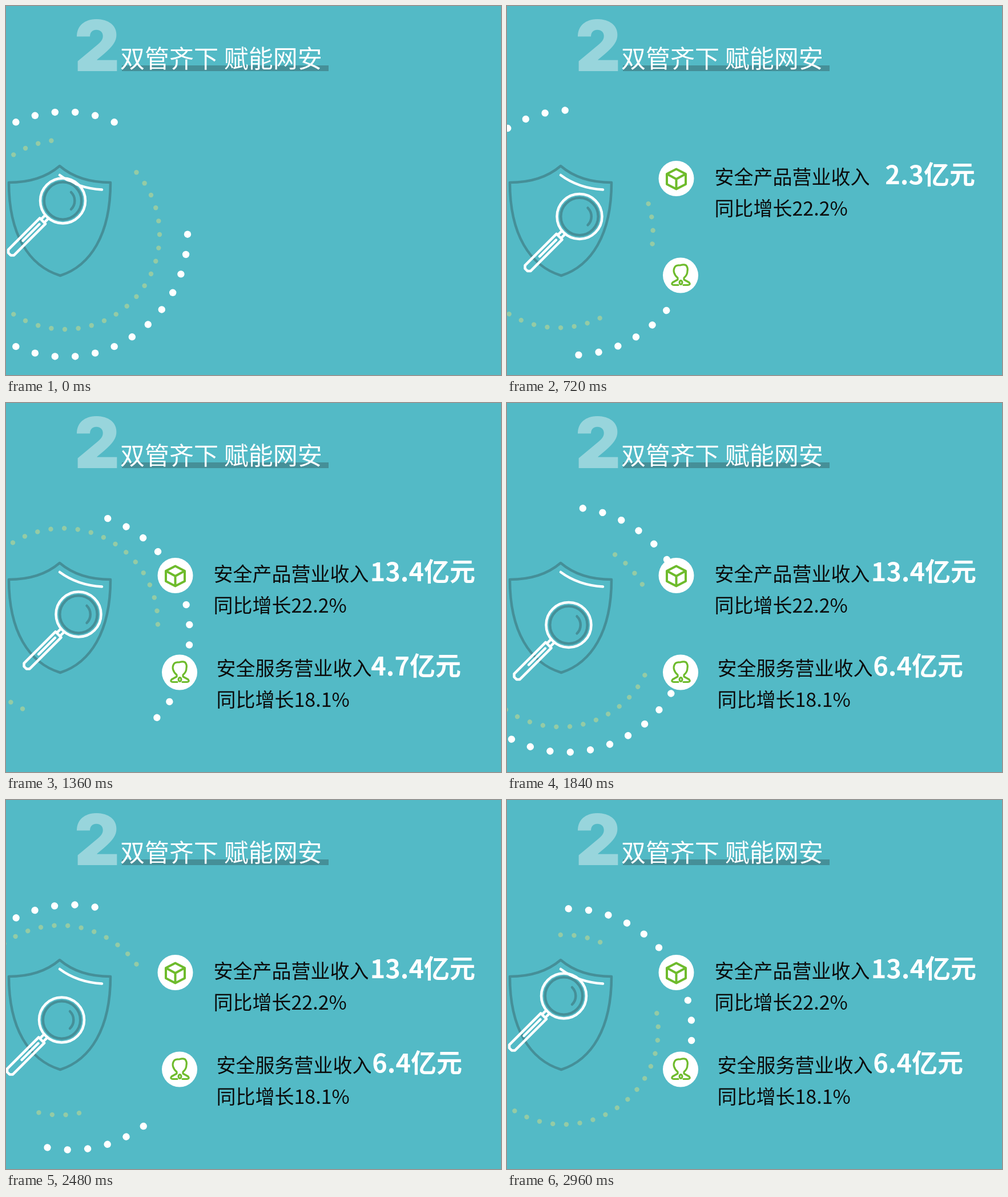
Write an HTML page that moves like this. It is 867 by 646 pixels and loops after 3000 ms.

```html
<!DOCTYPE html>
<html lang="zh-CN">
<head>
<meta charset="utf-8">
<style>
html, body { margin: 0; width: 100%; height: 100%; overflow: hidden; background: #53bac6; }
svg { display: block; width: 100vw; height: 100vh; font-family: "Noto Sans CJK SC", "Noto Sans CJK", "Noto Sans SC", sans-serif; }
.line { fill: none; stroke-width: 4.5; stroke-linecap: round; stroke-linejoin: round; }
.dark { stroke: #458f98; }
.light { stroke: #fff; }
.green { stroke: #6ebb2c; stroke-width: 4; }
.label { font-size: 34px; fill: #0b0b0b; }
.sum { font-size: 45px; font-weight: 700; fill: #fff; text-anchor: end; }
</style>
</head>
<body>
<svg viewBox="0 0 867 646">
  <text x="159.5" y="114" fill="#98d5dc" text-anchor="middle" style="font: 900 123px Inter, sans-serif">2</text>
  <rect x="203" y="104" width="362" height="10" fill="#458f98"/>
  <text x="200" y="107.5" font-size="43" fill="#fff">双管齐下 赋能网安</text>

  <g id="inner" fill="#94cba5"></g>
  <g id="outer" fill="#fff"></g>

  <path class="line dark" d="M94 280Q128 309 183 309C183 400 148 455 95 472C40 455 5 400 5 309Q60 309 94 280Z"/>
  <path class="line light" d="M94 296Q125 319 168 321.5"/>
  <g id="lens">
    <circle class="line dark" r="32.7"/>
    <path class="line dark" d="M14.5 -15A21 21 0 0 1 14.5 15"/>
    <circle class="line light" r="39.5"/>
    <path class="line light" transform="rotate(135)" d="M41 -4H49M41 4H49M50 -7H128L132 -3V3L128 7H50ZM58 0H99"/>
  </g>

  <g id="icon1">
    <circle cx="296.5" cy="302" r="31" fill="#fff"/>
    <path class="line green" d="M296.5 285.5L313 294V312L296.5 320.5L280 312V294ZM280 294L296.5 303L313 294M296.5 303V320"/>
  </g>
  <g id="icon2">
    <circle cx="304" cy="471.5" r="31" fill="#fff"/>
    <g class="line green" style="stroke-width:3.2">
      <path d="M300 488.5H292Q287 488 290 484L299 479V476C292 470 291 463 293 459Q295 453 303 454Q313 451 315 456Q317 459 316 464Q316 471 310 476V479L319 484Q322 488 317 488.5H309"/>
      <ellipse cx="304.5" cy="484" rx="2.4" ry="3.4"/>
    </g>
  </g>

  <g id="text1">
    <text class="label" x="363.5" y="312">安全产品营业收入</text>
    <text class="label" x="363.5" y="367">同比增长22.2%</text>
    <text class="sum" id="sum1" y="312"></text>
  </g>
  <g id="text2">
    <text class="label" x="368.5" y="476.5">安全服务营业收入</text>
    <text class="label" x="368.5" y="531.5">同比增长18.1%</text>
    <text class="sum" id="sum2" y="477"></text>
  </g>
</svg>
<script>
const LOOP = 3000, STEP = 40;
const $ = id => document.getElementById(id);
const ramp = (t, from, to) => Math.min(1, Math.max(0, (t - from) / (to - from)));

// Rings of evenly spaced dots; each run is [first slot, last slot].
function ring(id, cx, cy, radius, slots, size, runs) {
  for (const [first, last] of runs)
    for (let i = first; i <= last; i++) {
      const a = i * 2 * Math.PI / slots;
      const dot = document.createElementNS("http://www.w3.org/2000/svg", "circle");
      dot.setAttribute("cx", cx + radius * Math.cos(a));
      dot.setAttribute("cy", cy + radius * Math.sin(a));
      dot.setAttribute("r", size);
      $(id).append(dot);
    }
}
ring("outer", 103.5, 399.7, 214.5, 38, 6.2, [[-12, -7], [0, 12]]);
ring("inner", 103, 400, 166, 44, 4.2, [[-15, -12], [-5, 15]]);

// Lens path: time, x, y
const path = [[0, 99.5, 341], [400, 116, 378.5], [720, 127, 368.5], [1360, 127, 370],
              [1840, 108, 388.5], [2480, 97.5, 385], [2960, 99.5, 343]];

function knot(i) {
  const n = path.length, [t, x, y] = path[(i + n) % n];
  return [t + LOOP * Math.floor(i / n), x, y];
}

// Smooth closed curve through the path points
function lensAt(t) {
  let i = path.length - 1;
  while (path[i][0] > t) i--;
  const [a, b, c, d] = [i - 1, i, i + 1, i + 2].map(knot);
  const span = c[0] - b[0], u = (t - b[0]) / span, v = 1 - u;
  return [1, 2].map(k => {
    const m1 = (c[k] - a[k]) / (c[0] - a[0]) * span;
    const m2 = (d[k] - b[k]) / (d[0] - b[0]) * span;
    return b[k] * (1 + 2 * u) * v * v + m1 * u * v * v + c[k] * u * u * (3 - 2 * u) - m2 * u * u * v;
  });
}

function count(id, total, progress, right) {
  $(id).textContent = (total * progress).toFixed(1) + "亿元";
  $(id).setAttribute("x", right + (progress === 1 ? 2 : 0));
}

const move = (id, value) => $(id).setAttribute("transform", value);
const fade = (id, value) => $(id).setAttribute("opacity", value);

function draw(t) {
  move("outer", `rotate(${t * 0.2127} 108.9 399.4)`);
  move("inner", `rotate(${t * -0.3544} 97.4 393.5)`);
  move("lens", `translate(${lensAt(t)})`);
  fade("icon1", ramp(t, 320, 550));
  fade("icon2", ramp(t, 480, 680));
  fade("text1", ramp(t, 480, 640));
  fade("text2", ramp(t, 760, 920));
  count("sum1", 13.4, ramp(t, 600, 1300), 820);
  count("sum2", 6.4, ramp(t, 840, 1550), 797);
}

const start = performance.now();
function tick() {
  const t = (performance.now() - start) % LOOP;
  draw(Math.floor(t / STEP) * STEP);
  requestAnimationFrame(tick);
}
tick();
</script>
</body>
</html>
```
